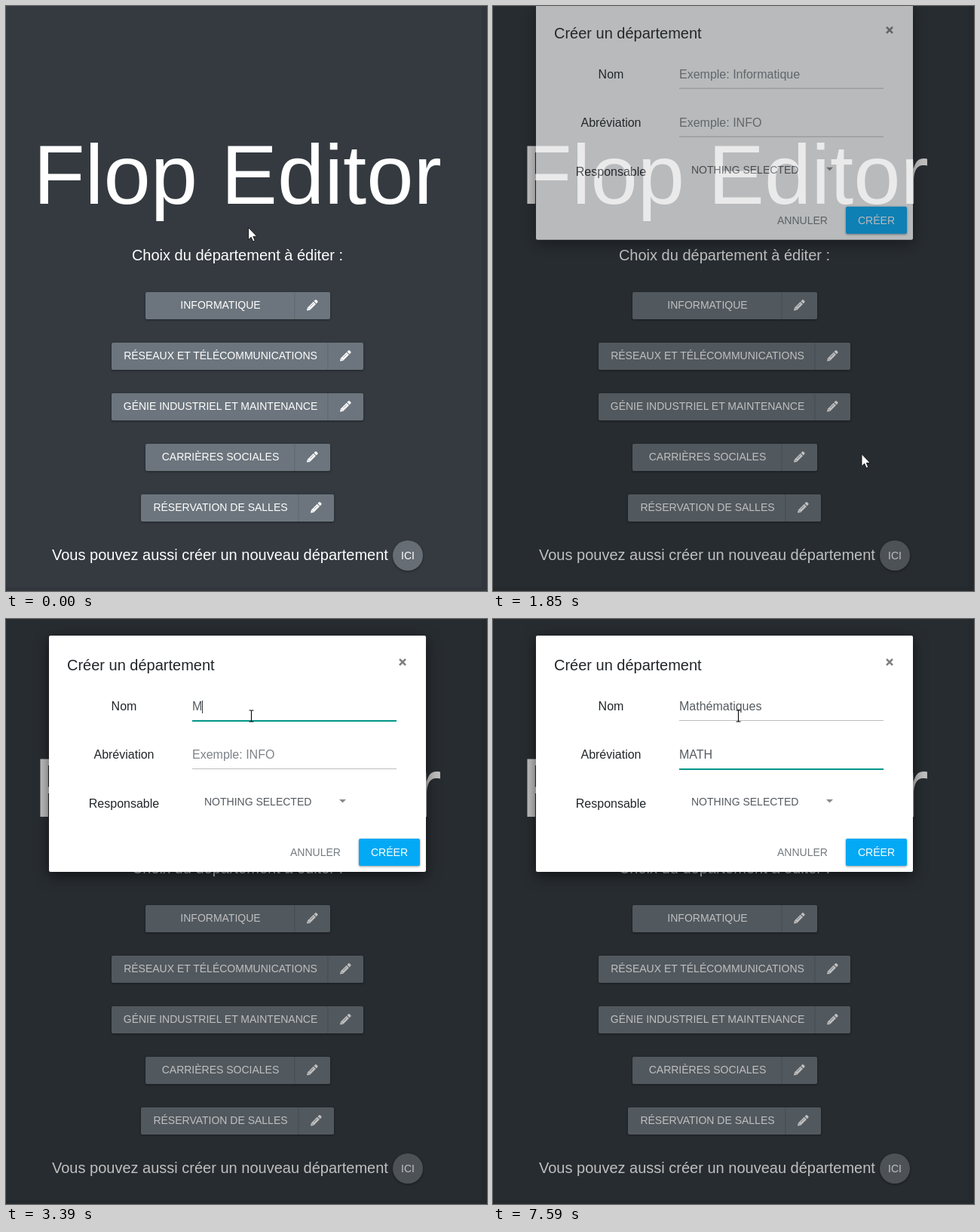
Recreate the animation shown at these times as an HTML page. Size 638x775 px, loop 8 s.

```html
<!DOCTYPE html>
<html lang="fr">
<head>
<meta charset="utf-8">
<title>Flop Editor</title>
<style>
  html, body { margin: 0; width: 100%; height: 100%; overflow: hidden; background: #343a40; }
  svg { display: block; width: 638px; height: 775px; font: 14px "Liberation Sans", Arial, sans-serif; }
  text { white-space: pre; }
  .mid { text-anchor: middle; }
  .white { fill: #fff; }
  .large { font-size: 20px; }
  .field { font-size: 16px; }
  .dark { fill: #212529; }
  .raised { filter: drop-shadow(0 1px 1.5px rgba(0, 0, 0, .4)); }
  .dialog { filter: drop-shadow(0 5px 9px rgba(0, 0, 0, .55)); }
</style>
</head>
<body>
<svg viewBox="0 0 638 775">
  <defs>
    <g id="pencil">
      <path fill="#fff" d="M10.3 2.2 11.9.6a1.5 1.5 0 0 1 2.1 0l1.4 1.4a1.5 1.5 0 0 1 0 2.1L13.8 5.7ZM9.5 3 13 6.5 4.6 14.9.7 15.7a.5.5 0 0 1-.6-.6L.9 11.6Z"/>
      <path fill="none" stroke="#6c757d" stroke-width=".8" d="M4.5 10.6 9.4 5.7M2 12.3l1.8 1.8"/>
    </g>
  </defs>

  <rect width="638" height="775" fill="#343a40"/>
  <path d="M631 0h7v775H0v-5h631Z" opacity=".07"/>
  <text class="mid white" x="307" y="262" font-size="112">Flop Editor</text>
  <text class="mid white large" x="307" y="337">Choix du département à éditer :</text>
  <g id="departments"></g>
  <text class="white large" x="61" y="734">Vous pouvez aussi créer un nouveau département</text>
  <circle id="here" class="raised" cx="533" cy="728" r="20"/>
  <text id="hereLabel" class="mid white" x="533" y="733">ICI</text>

  <rect id="backdrop" width="638" height="775"/>

  <g id="modal">
    <rect class="dialog" x="57" y="22" width="500" height="313" rx="2" fill="#fff"/>
    <text class="large dark" x="81" y="68">Créer un département</text>
    <path d="m522 53.2 8 8m0-8-8 8" stroke="#7f7f7f" stroke-width="2.6"/>
    <g class="mid field dark">
      <text x="156.5" y="121">Nom</text>
      <text x="156.5" y="185">Abréviation</text>
      <text x="156.5" y="250">Responsable</text>
    </g>
    <g id="fields"></g>
    <text x="263" y="247" fill="#555a5f">NOTHING SELECTED</text>
    <path d="M442 239h9l-4.5 4.5Z" fill="#8a8a8a"/>
    <text x="377" y="314" fill="#757b80">ANNULER</text>
    <rect class="raised" x="468" y="291" width="81" height="36" rx="2" fill="#03a9f4"/>
    <text class="mid white" x="508.5" y="314">CRÉER</text>
  </g>

  <path id="arrow" d="M0 0V16.2L3.7 12.7 6.2 18.5 8.7 17.4 6.3 11.8H11.3Z" fill="#fff" stroke="#111" stroke-width=".9"/>
  <path id="beam" d="M-3-7.5h2.2L0-6.8.8-7.5H3M0-7V7M-3 7.5h2.2L0 6.8.8 7.5H3" fill="none" stroke="#111" stroke-width="1.2"/>
</svg>
<script>
  const LOOP = 8000, MOVE_START = 840, STEP = 77;
  const BACKDROP_START = 1576, MODAL_START = 1740, BLINK = 530;
  const $ = id => document.getElementById(id);
  const clamp = v => Math.min(1, Math.max(0, v));

  const departments = [
    ["INFORMATIQUE", 185, 383, 430],
    ["RÉSEAUX ET TÉLÉCOMMUNICATIONS", 140, 427, 474],
    ["GÉNIE INDUSTRIEL ET MAINTENANCE", 140, 427, 474],
    ["CARRIÈRES SOCIALES", 185, 383, 430],
    ["RÉSERVATION DE SALLES", 179, 388, 435]
  ];
  $("departments").innerHTML = departments.map(([name, left, split, right], i) => {
    const y = 379 + 67 * i;
    return `<rect class="raised" x="${left}" y="${y}" width="${right - left}" height="36" rx="2" fill="#6c757d"/>
      <rect x="${split - 1}" y="${y}" width="1.5" height="36" fill="#626b73"/>
      <text class="mid white" x="284.5" y="${y + 22}">${name}</text>
      <use href="#pencil" transform="translate(${right - 31} ${y + 10}) scale(.92)"/>`;
  }).join("");

  const fields = [
    { y: 121, hint: "Exemple: Informatique", value: "Mathématiques", focus: 2500, blur: 6090,
      keys: [3390, 3620, 4020, 4020, 4250, 4480, 4630, 4860, 5110, 5260, 5340, 5490, 5720] },
    { y: 185, hint: "Exemple: INFO", value: "MATH", focus: 6090, blur: LOOP,
      keys: [6570, 6740, 6970, 7040] }
  ];
  $("fields").innerHTML = fields.map(({ y }) => `<g>
    <text class="field" x="247" y="${y}"></text>
    <rect x="247" y="${y + 13}" width="271" height="1" fill="#bdbdbd"/>
    <rect y="${y + 13}" height="2" fill="#009688"/>
    <rect y="${y - 13}" width="1" height="17" fill="#333"/></g>`).join("");
  fields.forEach((field, i) => {
    [field.text, , field.underline, field.caret] = $("fields").children[i].children;
  });

  // time, x, y of the pointer
  const pointer = [
    [840, 321.5, 293.5], [1000, 350, 350], [1230, 450, 560], [1460, 528, 712], [1687, 530.5, 715.5],
    [1764, 519, 668], [1841, 489, 593.5], [1918, 447, 505.5], [1995, 401, 410], [2072, 364, 310],
    [2149, 341, 220], [2226, 329, 160], [2303, 326, 134], [2380, 325.5, 128.5]
  ];
  function pointerAt(t) {
    const next = pointer.findIndex(p => p[0] > t);
    if (next === 0) return pointer[0].slice(1);
    if (next < 0) return pointer[pointer.length - 1].slice(1);
    const [t0, x0, y0] = pointer[next - 1], [t1, x1, y1] = pointer[next];
    const k = (t - t0) / (t1 - t0);
    return [x0 + (x1 - x0) * k, y0 + (y1 - y0) * k];
  }

  // CSS ease-out: cubic-bezier(0, 0, .58, 1)
  function easeOut(x) {
    if (x <= 0 || x >= 1) return clamp(x);
    let low = 0, high = 1;
    for (let i = 0; i < 20; i++) {
      const s = (low + high) / 2;
      if (1.74 * s * s - .74 * s ** 3 < x) low = s; else high = s;
    }
    return 3 * low * low - 2 * low ** 3;
  }

  function drawField(field, t) {
    const { text, underline, caret, keys, focus, blur } = field;
    const focused = t >= focus && t < blur;
    const typed = keys.filter(k => k <= t);
    text.textContent = typed.length ? field.value.slice(0, typed.length) : field.hint;
    text.setAttribute("fill", typed.length ? "#555b61" : "#7c8288");

    const width = focused ? 271 * easeOut((t - focus) / 300) : 0;
    underline.setAttribute("x", 382.5 - width / 2);
    underline.setAttribute("width", width);

    const lastInput = typed.length ? typed[typed.length - 1] : focus;
    const blinkOn = (t - Math.max(focus, lastInput)) % (2 * BLINK) < BLINK;
    caret.style.display = focused && blinkOn ? "" : "none";
    caret.setAttribute("x", Math.round(247 + (typed.length ? text.getComputedTextLength() : 0)));
  }

  function render(t) {
    const tick = t < MOVE_START ? 0 : MOVE_START + STEP * Math.floor((t - MOVE_START) / STEP);

    $("backdrop").setAttribute("opacity", .25 * clamp((tick - BACKDROP_START) / 150));
    const shown = tick - MODAL_START;
    $("modal").setAttribute("opacity", clamp(shown / 150));
    $("modal").setAttribute("transform", `translate(0 ${-50 * (1 - easeOut(shown / 300))})`);

    const hovered = tick >= 1400 && tick < 1764;
    $("here").setAttribute("fill", hovered ? "#858a8e" : "#666d74");
    $("hereLabel").setAttribute("opacity", hovered ? .75 : 1);

    const [x, y] = pointerAt(tick);
    const overInput = tick > 2000 && y < 137;
    for (const id of ["arrow", "beam"]) {
      $(id).setAttribute("transform", `translate(${x} ${y})`);
      $(id).style.display = (id === "beam") === overInput ? "" : "none";
    }
    fields.forEach(field => drawField(field, t));
  }

  const start = performance.now();
  function loop() {
    render((performance.now() - start) % LOOP);
    requestAnimationFrame(loop);
  }
  loop();
</script>
</body>
</html>
```
